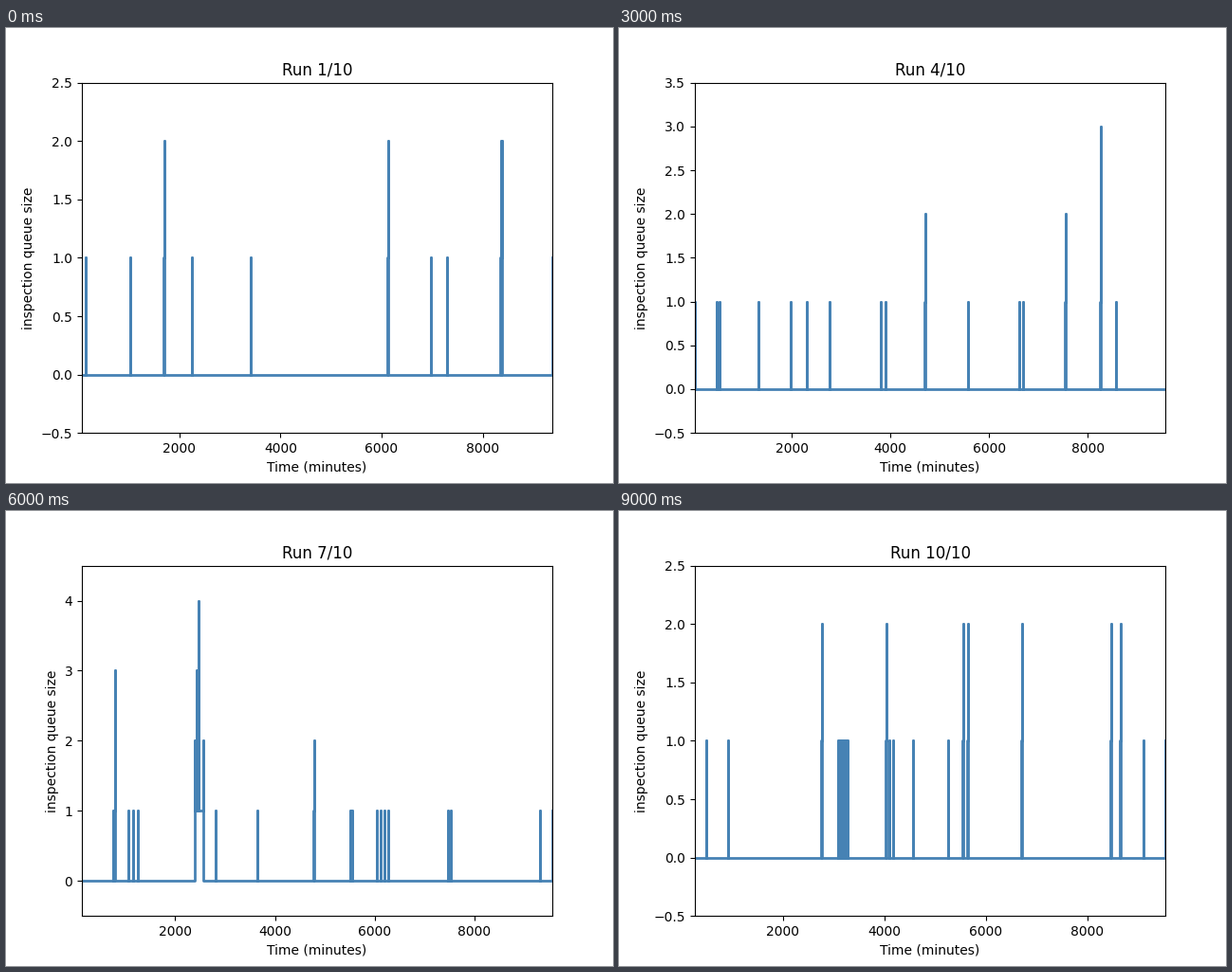
These frames come from a looping animation (640x480 px, 10 s). A matplotlib script:

```python
import random

import matplotlib.pyplot as plt
from matplotlib.animation import FuncAnimation

LEFT, RIGHT = 80, 576  # plot area in pixels
GAP = 14               # free space kept around the busy moments


def spike(x):
    """One part waits and is taken at once."""
    return [(x, 1), (x, 0)]


def peak(x, height):
    return [(x - 1, 1), (x, height), (x, 0)]


def rush(first, last, heights):
    """The queue stays at one or more, with a jump every two pixels."""
    points = []
    for k, height in enumerate(heights):
        points += [(first + 2 * k, height), (first + 2 * k, 1)]
    return points + [(last, 2), (last, 0)]


def build(seed, span, singles, peaks, bursts=(), busy=(), open_end=False):
    """Points (pixel, size) of one run; lone spikes fall at random."""
    rng = random.Random(seed)
    blocks = [spike(x) for x in span]
    blocks += [peak(x, height) for x, height in peaks.items()]
    blocks += [spike(x) for burst in bursts for x in range(*burst)]
    blocks += [rush(*args) for args in busy]
    taken = [block[0][0] for block in blocks]
    free = [x for x in range(*span) if all(abs(x - t) > GAP for t in taken)]
    blocks += [spike(x) for x in rng.sample(free, singles)]
    blocks.sort(key=lambda block: block[0][0])
    if open_end:
        blocks.append([(RIGHT, 1)])
    return [point for block in blocks for point in block]


# Start and end minute, then the points of the queue.
RUNS = [
    (74, 9374, build(1, (84, 465), 4, {167: 2, 403: 2, 522: 2, 523: 2},
                     open_end=True)),
    (60, 9500, build(2, (83, 556), 10, {190: 2, 372: 2})),
    (86, 9533, build(3, (91, 467), 9, {268: 2, 360: 2, 479: 2, 480: 2},
                     [(116, 123, 6)])),
    (38, 9569, build(4, (80, 524), 5, {323: 2, 471: 2, 508: 3},
                     [(103, 107, 3), (276, 282, 5), (422, 430, 4)])),
    (60, 9560, build(5, (98, 560), 13, {240: 2, 415: 2})),
    (42, 9564, build(6, (113, 571), 7, {129: 2},
                     [(167, 171, 3), (301, 305, 3), (503, 506, 2),
                      (521, 532, 3)],
                     [(487, 490, (2, 3))], open_end=True)),
    (124, 9571, build(7, (113, 563), 2, {115: 3, 325: 2},
                      [(129, 141, 5), (363, 366, 2), (391, 404, 4),
                       (466, 470, 3)],
                      [(199, 208, (2, 3, 4))], open_end=True)),
    (110, 9560, build(8, (103, 568), 15, {205: 2, 330: 2, 452: 2})),
    (124, 9571, build(9, (109, 566), 8, {289: 2, 447: 2, 481: 2},
                      [(159, 161), (223, 225), (252, 255, 2)],
                      [(357, 369, (1, 2, 2, 2))])),
    (271, 9542, build(10, (92, 553), 3,
                      {214: 2, 282: 2, 363: 2, 368: 2, 425: 2,
                       519: 2, 529: 2},
                      [(231, 243, 2), (285, 290, 4)], open_end=True)),
]

fig, ax = plt.subplots(figsize=(6.4, 4.8), dpi=100)


def draw(i):
    start, end, points = RUNS[i]
    scale = (end - start) / (RIGHT - LEFT)
    times = [start + (x - LEFT) * scale for x, _ in points]
    sizes = [size for _, size in points]
    ax.clear()
    ax.plot([start, *times, end], [0, *sizes, sizes[-1]],
            drawstyle="steps-post", color="steelblue", linewidth=2)
    ax.set_xlim(start, end)
    ax.set_ylim(-0.5, max(sizes) + 0.5)
    ax.set_title(f"Run {i + 1}/{len(RUNS)}")
    ax.set_xlabel("Time (minutes)")
    ax.set_ylabel("inspection queue size")


anim = FuncAnimation(fig, draw, frames=len(RUNS), init_func=lambda: None,
                     interval=1000, repeat=True, repeat_delay=0)
plt.show()
```
